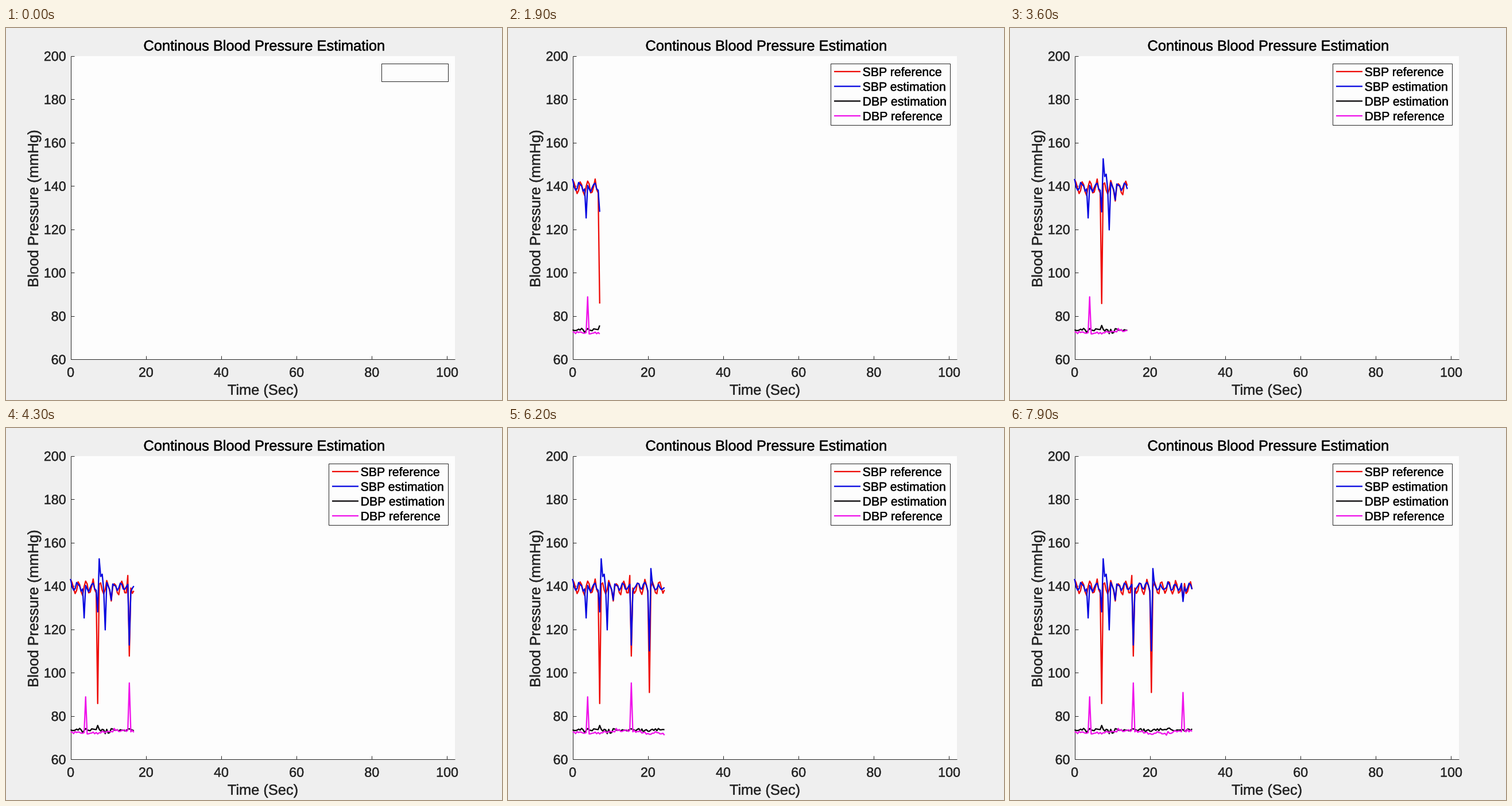
Recreate the animation shown at these times as a matplotlib script. Size 864 px wide and 648 px high, loop 8000 ms.

```python
import numpy as np
import matplotlib.pyplot as plt
from matplotlib import patheffects
from matplotlib.animation import FuncAnimation
from matplotlib.patches import Circle, Polygon, Rectangle

plt.rcParams.update({
    "font.family": "Liberation Sans",
    "text.hinting": "none",
    "text.hinting_factor": 1,
    "toolbar": "None",
})

W, H, DPI = 864, 648, 72          # 72 dpi: one point is one pixel
FRAMES, INTERVAL = 80, 100
STEP = 0.4                        # seconds of signal per frame
BG, PLOT_BG, INK, GREY = "#efefef", "#fdfdfd", "#262626", "#858585"
LEFT, RIGHT, TOP, BOTTOM = 112.5, 782, 48.5, 576.5
TOOLBAR_ON, TOOLBAR_OFF = 51, 58
BREATH, FIRST_PEAK = 4.77, 5.3    # breathing rhythm, in samples

rng = np.random.default_rng(4)
n = np.arange(FRAMES - 1)


def px(sec):
    return LEFT + 6.558 * np.asarray(sec)


def py(mmhg):
    return TOP + 3.775 * (200 - np.asarray(mmhg))


def wave(period, peak):
    return np.cos(2 * np.pi * (n - peak) / period)


def signal(base, noise, beats):
    """Base curve with seeded jitter and a few outlying beats."""
    y = base + rng.normal(0, noise, n.size)
    for k, v in beats.items():
        y[k] = v
    return y


SERIES = [
    ("SBP reference", "#ee0a06",
     signal(139.1 + 3 * wave(BREATH, FIRST_PEAK), 0.5,
            {0: 143, 18: 85.7, 27: 133, 38: 144.8, 39: 107.6, 51: 90.8,
             72: 134})),
    ("SBP estimation", "#0505e0",
     signal(139.5 + 1.7 * wave(BREATH, FIRST_PEAK - 0.5), 0.5,
            {0: 143.2, 9: 125.2, 18: 128, 19: 152.5, 20: 144.3, 21: 145.4,
             23: 119.7, 27: 133.5, 39: 112.7, 51: 110, 52: 148, 72: 132.8})),
    ("DBP estimation", "#080508",
     signal(73.5, 0.4, {18: 75.6, 23: 71.8, 25: 72})),
    ("DBP reference", "#ef12ea",
     signal(72.5 + 0.8 * wave(42, 34), 0.4, {10: 88.8, 39: 95.2, 72: 90.8})),
]

fig = plt.figure(figsize=(W / DPI, H / DPI), dpi=DPI, facecolor=BG)
ax = fig.add_axes([0, 0, 1, 1])
ax.set_xlim(0, W)
ax.set_ylim(H, 0)
ax.axis("off")


def stroke(xs, ys, color=INK, lw=1.0, **kw):
    return ax.plot(xs, ys, color=color, lw=lw, solid_joinstyle="round",
                   solid_capstyle="butt", **kw)[0]


def label(x, y, s, size, ha="center", color=INK, **kw):
    weight = patheffects.withStroke(linewidth=0.35, foreground=color)
    return ax.text(x, y, s, fontsize=size, ha=ha, va="baseline", color=color,
                   path_effects=[weight], **kw)


def box(x0, y0, x1, y1, face, edge="none", **kw):
    return ax.add_patch(Rectangle((x0, y0), x1 - x0, y1 - y0,
                                  facecolor=face, edgecolor=edge, lw=1, **kw))


# Axes
box(LEFT, TOP, RIGHT, BOTTOM, PLOT_BG)
stroke([LEFT, LEFT], [TOP, BOTTOM])
stroke([LEFT, RIGHT], [BOTTOM, BOTTOM])
for v in range(60, 201, 20):
    y = py(v)
    stroke([LEFT, LEFT + 6], [y, y])
    label(104.2, y + 8.6, str(v), 23.3, "right")
for t in range(0, 101, 20):
    x = px(t)
    stroke([x, x], [BOTTOM - 6, BOTTOM])
    label(x, 607.6, str(t), 23.3)
label(446.5, 39.3, "Continous Blood Pressure Estimation", 25.4, color="black")
label(446.5, 638.8, "Time (Sec)", 25.4)
label(56, 312.5, "Blood Pressure (mmHg)", 25.6, rotation=90,
      rotation_mode="anchor")

# Signals
xs = px(n * STEP)
curves = [(stroke([], [], color, 2.3, zorder=3), py(values))
          for _, color, values in SERIES]

# Legend
empty_legend = box(653.5, 61.5, 769.5, 92.5, PLOT_BG, INK, zorder=4)
legend = [box(561.5, 61.5, 769.5, 168.5, PLOT_BG, INK, zorder=4)]
for i, (name, color, _) in enumerate(SERIES):
    y = 75.9 + 25.7 * i
    legend.append(stroke([568, 614], [y, y], color, 2.3, snap=False, zorder=5))
    legend.append(label(617.6, y + 7.8, name, 21.3, "left", "black", zorder=5))

# Hover toolbar, covering the end of the title
toolbar = [box(567, 17, 784, 47, BG, zorder=6)]


def icon(pts, lw=1.8):
    x, y = zip(*pts)
    toolbar.append(stroke(x, y, GREY, lw, zorder=7))


def solid(pts):
    toolbar.append(ax.add_patch(Polygon(pts, facecolor=GREY, lw=0, zorder=7)))


def lens(cx, cy):
    toolbar.append(ax.add_patch(Circle((cx, cy), 8.3, facecolor="none",
                                       edgecolor=GREY, lw=1.8, zorder=7)))
    icon([(cx - 4.5, cy), (cx + 4.5, cy)])
    icon([(cx + 6, cy + 6), (cx + 14, cy + 14.5)], 3)


# export
icon([(570, 34), (570, 41), (588, 41), (588, 37)])
icon([(573, 36), (577, 29), (584, 27)])
icon([(582, 21), (589, 27), (582, 33)])
solid([(588, 42), (594, 42), (594, 36)])
# brush
icon([(617, 33), (618, 20), (621, 20), (621, 33)])
icon([(612, 33), (623, 33)])
solid([(611, 37), (623, 37), (623, 44), (604, 44)])
# data tip
icon([(634, 29), (634, 20), (655, 20), (655, 44), (634, 44), (634, 35),
      (631, 32), (634, 29)])
for y in (27, 32, 37):
    icon([(639, y), (650, y)])
# hand
icon([(684, 33), (680, 43), (671, 43), (663, 32), (668, 33)])
for i, tip in enumerate((23, 20, 21, 25)):
    x = 668 + 4 * i
    icon([(x, 33), (x, tip), (x + 4, tip), (x + 4, 33)])
# zoom in and out
lens(703, 30)
icon([(703, 25.5), (703, 34.5)])
lens(734, 30)
# home
icon([(755, 33), (767, 20), (779, 33)])
icon([(759, 30), (759, 44), (764, 44), (764, 36), (770, 36), (770, 44),
      (775, 44), (775, 30)])


def update(f):
    for line, ys in curves:
        line.set_data(xs[:f], ys[:f])
    empty_legend.set_visible(f == 0)
    for part in legend:
        part.set_visible(f > 0)
    for part in toolbar:
        part.set_visible(TOOLBAR_ON <= f < TOOLBAR_OFF)
    return []


anim = FuncAnimation(fig, update, frames=FRAMES, interval=INTERVAL,
                     init_func=lambda: update(0), repeat=True, repeat_delay=0)
plt.show()
```
